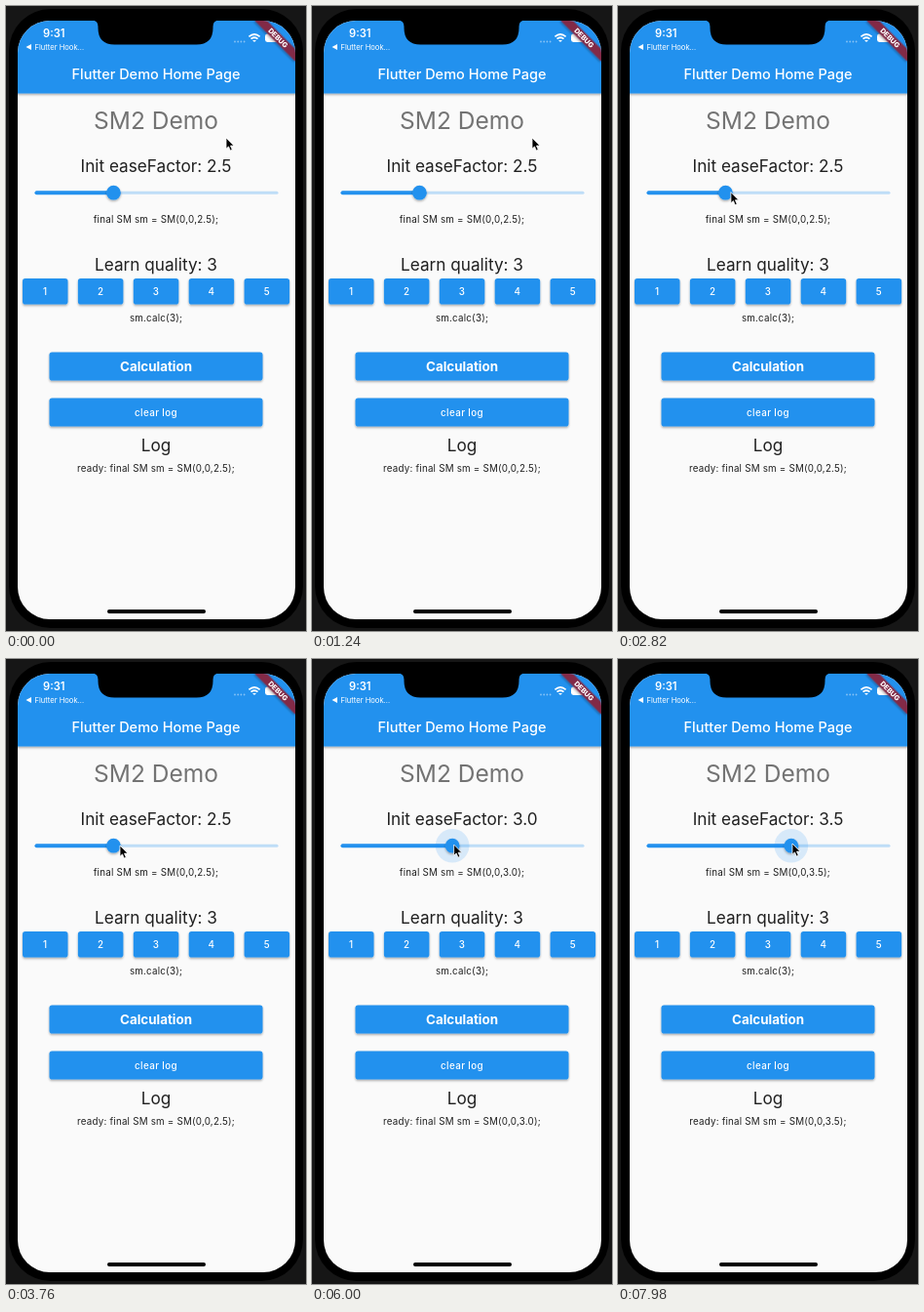
Write an HTML page that moves like this. It is 308x640 px and loops after 8000 ms.

```html
<!DOCTYPE html>
<html lang="en">
<head>
<meta charset="utf-8">
<title>SM2 Demo</title>
<style>
  html, body { margin: 0; height: 100%; overflow: hidden; background: #161616; }
  svg { display: block; width: 100vw; height: 100vh; }
  text { font-family: Inter, Roboto, sans-serif; fill: #202020; }
  .primary { fill: #2491ee; }
  .mid { text-anchor: middle; }
  .headline { font-size: 24.5px; fill: #737373; }
  .title { font-size: 17.2px; }
  .body { font-size: 9.8px; letter-spacing: .21px; }
  .light { fill: #fff; }
  .bar { font-size: 14.5px; font-weight: 500; }
  .button { font-size: 9.8px; font-weight: 500; letter-spacing: .4px; }
  .strong { font-size: 13.4px; font-weight: 700; }
</style>
</head>
<body>
<svg viewBox="0 0 308 640" preserveAspectRatio="none">
  <defs>
    <clipPath id="screen"><rect x="12" y="15" width="285" height="613" rx="33"/></clipPath>
    <filter id="shadow" x="-10%" y="-20%" width="120%" height="150%">
      <feDropShadow dx="0" dy="1.3" stdDeviation="1" flood-opacity=".35"/>
    </filter>
  </defs>

  <rect width="308" height="640" fill="#161616"/>
  <rect x="3" y="3" width="302" height="634" rx="43" fill="#000"/>

  <g clip-path="url(#screen)">
    <rect x="12" y="15" width="285" height="613" fill="#fafafa"/>
    <rect x="6" y="10" width="297" height="79.5" class="primary" filter="url(#shadow)"/>

    <text x="38" y="31.8" class="light" font-size="11.2" font-weight="600">9:31</text>
    <path d="M20.5 42l5.5-3v6z" fill="#fff"/>
    <text x="29.5" y="45" class="light" font-size="7.6">Flutter Hook...</text>
    <g fill="#fff" opacity=".45">
      <circle cx="235" cy="36.5" r=".9"/><circle cx="238.2" cy="36.5" r=".9"/>
      <circle cx="241.4" cy="36.5" r=".9"/><circle cx="244.6" cy="36.5" r=".9"/>
    </g>
    <g fill="none" stroke="#fff" stroke-width="1.7">
      <path d="M249.4 31.4q5.6-4.8 11.2 0M251.5 33.7q3.5-2.9 7 0"/>
      <path d="M253 34.9h4l-2 2.2z" fill="#fff" stroke="none"/>
    </g>
    <rect x="266" y="28.5" width="16.5" height="8.5" rx="2.4" fill="#fff"/>
    <rect x="283.3" y="31.2" width="1.2" height="3" rx=".6" fill="#fff" opacity=".5"/>
    <text x="154" y="74.7" class="mid light bar">Flutter Demo Home Page</text>

    <g transform="translate(297 15) rotate(45)">
      <rect x="-29" y="20.5" width="58" height="9" fill="#822c46" filter="url(#shadow)"/>
      <text y="27.6" class="mid light" font-size="7.2" font-weight="800">DEBUG</text>
    </g>

    <text x="154" y="126" class="mid headline">SM2 Demo</text>
    <text x="154" y="169.6" class="mid title" id="factor"></text>

    <rect x="29.5" y="189.7" width="250" height="3" rx="1.5" class="primary" opacity=".28"/>
    <rect x="29.5" y="189.2" height="4" rx="2" class="primary" id="track"/>
    <circle cy="191.2" class="primary" opacity=".16" id="halo"/>
    <circle cy="191.2" r="7.4" class="primary" filter="url(#shadow)" id="thumb"/>

    <text x="154" y="222" class="mid body" id="code"></text>
    <text x="154" y="270.8" class="mid title">Learn quality: 3</text>
    <g id="buttons"></g>
    <text x="154" y="323" class="mid body">sm.calc(3);</text>
    <text x="154" y="456" class="mid title">Log</text>
    <text x="154" y="476.8" class="mid body" id="log"></text>
    <rect x="104" y="618" width="101" height="4" rx="2" fill="#000"/>
  </g>

  <path d="M88 14.5q6.500 0 6.500 6.500v1.500q0 17 17 17h84q17 0 17-17V21q0-6.500 6.500-6.500z" fill="#000"/>

  <path id="cursor" d="M0 0v11.2l2.500-2.300 1.800 4.200 2-.9-1.800-4.100h3.600z"
        fill="#000" stroke="#fff" stroke-width=".8" stroke-linejoin="round"/>
</svg>

<script>
const DURATION = 8000;
const TRACK_START = 29.5, TRACK_WIDTH = 249.5, MIN = 1.3, MAX = 5;
const PRESS_TIME = 4200, PRESS_X = 117, DRAG_SLOP = 15.2;
const byId = id => document.getElementById(id);

function button(x, y, width, height, label, style = 'button', rise = 3.6) {
  return `<rect x="${x}" y="${y}" width="${width}" height="${height}" rx="2.8" class="primary" filter="url(#shadow)"/>
    <text x="${x + width / 2}" y="${y + height / 2 + rise}" class="mid light ${style}">${label}</text>`;
}
byId('buttons').innerHTML =
  [1, 2, 3, 4, 5].map((n, i) => button(17 + 56.9 * i, 279, 46.5, 26.5, n)).join('') +
  button(44.5, 354.5, 219, 29, 'Calculation', 'strong', 4.8) +
  button(44.5, 401.5, 219, 29, 'clear log');

const clamp = p => Math.min(1, Math.max(0, p));
const linear = p => p;
const smooth = p => p * p * (3 - 2 * p);

// Moves run one after another: two glides, then a steady drag.
const moves = [
  { start: 1450, end: 2080, dx: -142, dy: 45, ease: smooth },
  { start: 2180, end: 2900, dx: 33, dy: 11, ease: smooth },
  { start: 4300, end: DURATION, dx: 62.3, dy: -2, ease: linear }
];

function pointerAt(time) {
  let x = 226, y = 135;
  for (const { start, end, dx, dy, ease } of moves) {
    const p = ease(clamp((time - start) / (end - start)));
    x += dx * p;
    y += dy * p;
  }
  return { x, y };
}

// A press sets the value under the pointer; it follows once the drag passes the slop.
function valueAt(time, x) {
  if (time < PRESS_TIME) return '2.5';
  const dragX = x - PRESS_X > DRAG_SLOP ? x : PRESS_X;
  return (MIN + (dragX - TRACK_START) / TRACK_WIDTH * (MAX - MIN)).toFixed(1);
}

function draw(time) {
  const { x, y } = pointerAt(time);
  const value = valueAt(time, x);
  const thumbX = TRACK_START + (value - MIN) / (MAX - MIN) * TRACK_WIDTH;
  const call = `final SM sm = SM(0,0,${value});`;

  byId('cursor').setAttribute('transform', `translate(${x} ${y})`);
  byId('track').setAttribute('width', thumbX - TRACK_START);
  byId('thumb').setAttribute('cx', thumbX);
  byId('halo').setAttribute('cx', thumbX);
  byId('halo').setAttribute('r', 17.3 * smooth(clamp((time - PRESS_TIME) / 150)));
  byId('factor').textContent = `Init easeFactor: ${value}`;
  byId('code').textContent = call;
  byId('log').textContent = `ready: ${call}`;
}

const start = performance.now();
function frame() {
  draw((performance.now() - start) % DURATION);
  requestAnimationFrame(frame);
}
frame();
</script>
</body>
</html>
```
